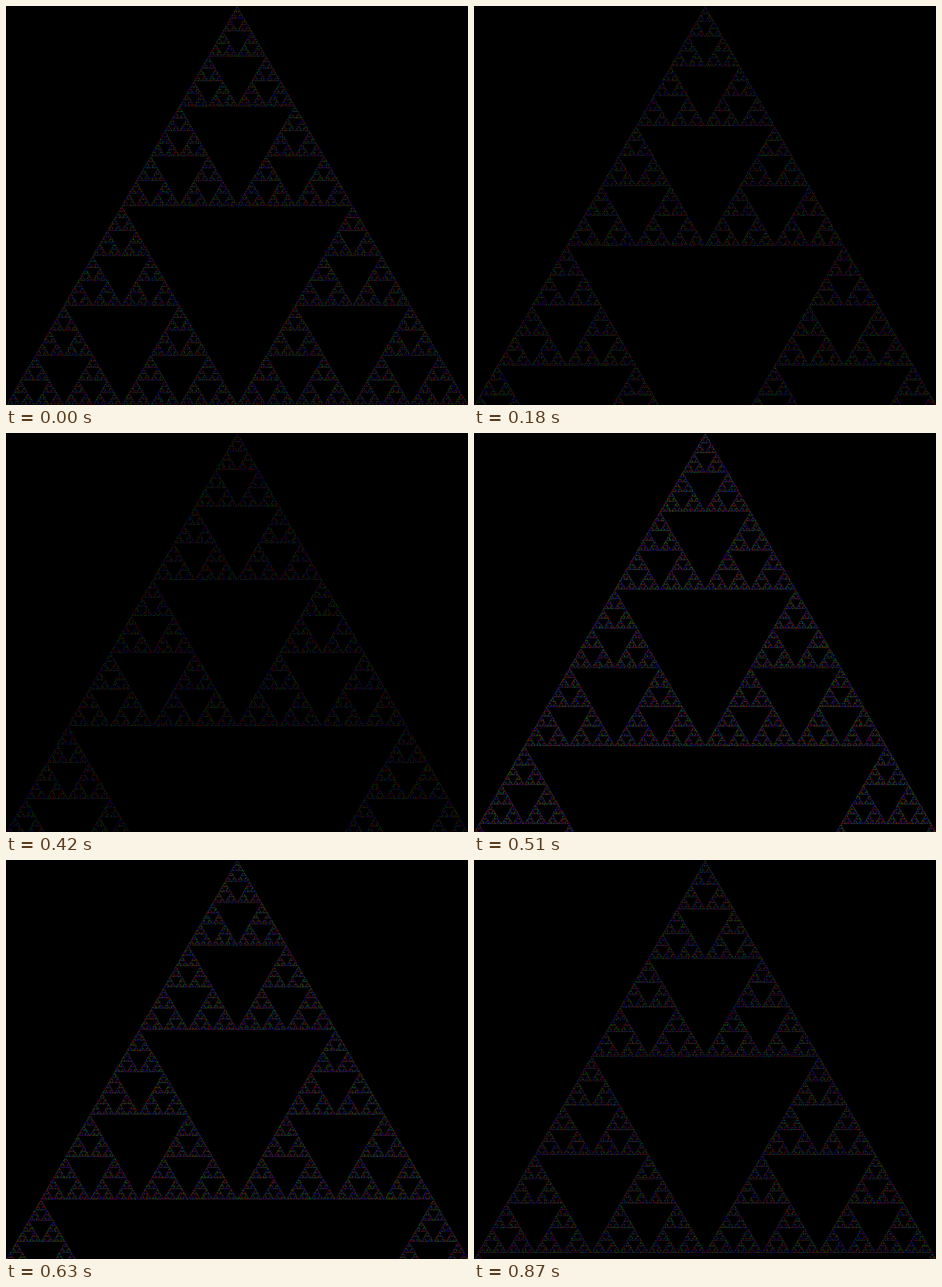
An HTML page with a canvas for the animation above (900 ms loop, 804 by 696 pixels).

```html
<!DOCTYPE html>
<html>
<head>
<meta charset="utf-8">
<style>
  html, body { margin: 0; background: #000; overflow: hidden; }
  canvas { display: block; }
</style>
</head>
<body>
<canvas id="stage" width="804" height="696"></canvas>
<script>
const W = 804, H = 696, LOOP = 900, STEP = 30;
const ctx = document.getElementById('stage').getContext('2d');
const colors = [0xff0000a0, 0xff008000, 0xffc00000]; // ABGR: red, green, blue

function randomFrom(seed) {
  return () => {
    seed = (seed + 0x6d2b79f5) | 0;
    let v = Math.imul(seed ^ (seed >>> 15), 1 | seed);
    v ^= v + Math.imul(v ^ (v >>> 7), 61 | v);
    return ((v ^ (v >>> 14)) >>> 0) / 4294967296;
  };
}

function draw(step) {
  const random = randomFrom(step * 977 + 1);
  const image = ctx.createImageData(W, H);
  const pixels = new Uint32Array(image.data.buffer).fill(0xff000000);

  // The triangle doubles in size over one loop; leaves split once they are 2px high.
  const scale = 1 + step * STEP / LOOP;
  let rowHeight = H * scale / 512;
  if (rowHeight > 2) rowHeight /= 2;
  const spacing = rowHeight * W / H;

  for (let row = 0; ; row++) {
    const y = Math.round((row + 0.67) * rowHeight);
    if (y >= H) break;
    // The odd entries of Pascal's triangle are the submasks of the row number.
    for (let col = row; col >= 0; col = col ? (col - 1) & row : -1) {
      const x = Math.round(W / 2 + (col - row / 2) * spacing);
      if (x >= 0 && x < W) pixels[y * W + x] = colors[Math.floor(random() * 3)];
    }
  }
  ctx.putImageData(image, 0, 0);
}

let shown = -1;
function tick() {
  const step = Math.floor(performance.now() % LOOP / STEP);
  if (step !== shown) draw(shown = step);
  requestAnimationFrame(tick);
}
tick();
</script>
</body>
</html>
```
